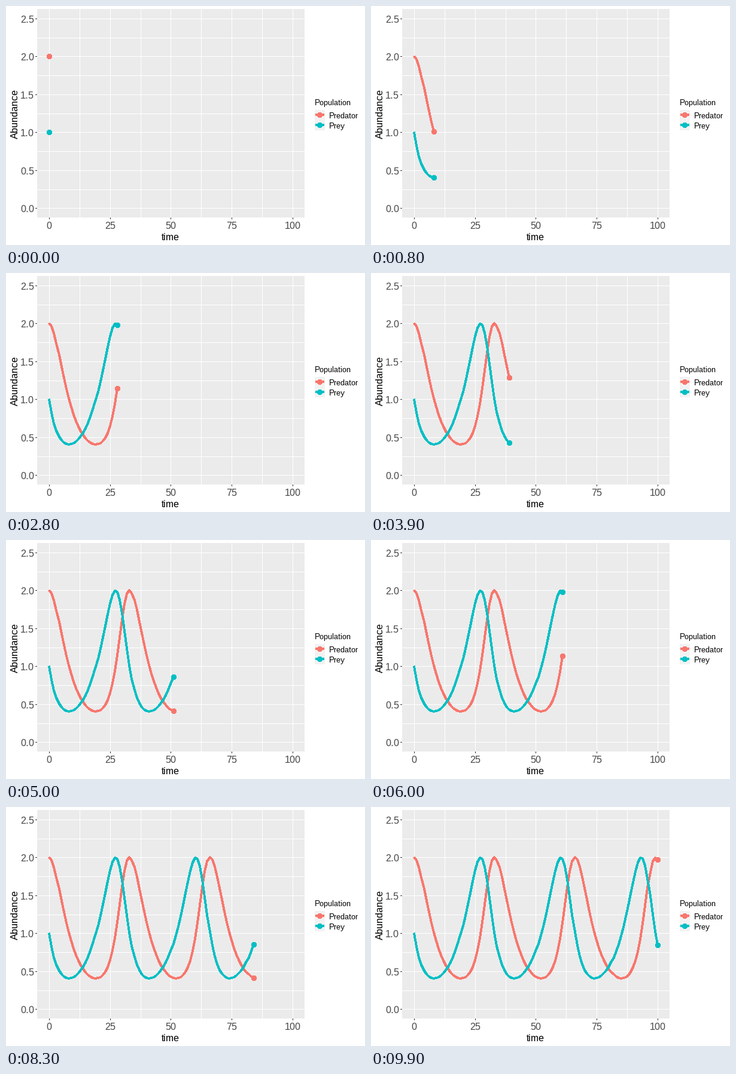
Recreate the animation shown at these times as a matplotlib script. Size 600 px wide and 400 px high, loop 10000 ms.

```python
import numpy as np
import matplotlib.pyplot as plt
from matplotlib.animation import FuncAnimation
from matplotlib.patches import Circle, Rectangle

plt.rcParams.update({
    "font.family": "Liberation Sans",
    "text.hinting": "native",
    "text.hinting_factor": 1,
    "path.simplify": False,
})

W, H, DPI = 600, 400, 100
PX = 72 / DPI  # one pixel in points
FRAMES, T_END = 100, 100
LEFT, TOP, RIGHT, BOTTOM = 52, 5, 499, 354
RED, TEAL = "#F8766D", "#00BFC4"

# Without antialiasing every touched pixel is filled, so these sizes
# come out as a 4 px line and a 9 px dot.
LINE_W, DOT_R = 2.8, 3.9


def col(t):
    return np.floor(72.25 + 4.0645 * np.asarray(t) + 0.5)


def row(v):
    return np.floor(338.25 - 126.9 * np.asarray(v) + 0.5)


def rate(s, k=0.2):
    prey, pred = s
    return k * np.array([prey * (1 - pred), pred * (prey - 1)])


def simulate(steps=10):
    """Predator-prey cycle sampled at whole time units (Runge-Kutta)."""
    s, h = np.array([1.0, 2.0]), 1 / steps
    out = [s]
    for _ in range(T_END):
        for _ in range(steps):
            a = rate(s)
            b = rate(s + h / 2 * a)
            c = rate(s + h / 2 * b)
            d = rate(s + h * c)
            s = s + h / 6 * (a + 2 * b + 2 * c + d)
        out.append(s)
    return np.array(out).T


fig = plt.figure(figsize=(W / DPI, H / DPI), dpi=DPI, facecolor="white")
ax = fig.add_axes([0, 0, 1, 1])
ax.set_xlim(0, W)
ax.set_ylim(H, 0)
ax.axis("off")


def box(x, y, w, h, color, z=1):
    ax.add_patch(Rectangle((x, y), w, h, fc=color, lw=0, antialiased=False, zorder=z))


def label(x, y, s, size, color="black", ha="left", rot=0):
    ax.text(x, y, s, fontsize=size * PX, color=color, ha=ha, va="baseline",
            rotation=rot, rotation_mode="anchor", zorder=9)


def stroke(x, y, color):
    return ax.plot(x, y, color=color, lw=LINE_W * PX, antialiased=False, snap=False,
                   solid_capstyle="butt", solid_joinstyle="round", zorder=4)[0]


def dot(x, y, color):
    return ax.add_patch(Circle((x + 0.5, y + 0.5), DOT_R, fc=color, lw=0,
                               antialiased=False, snap=False, zorder=5))


# panel, grid and axes
box(LEFT, TOP, RIGHT - LEFT, BOTTOM - TOP, "#EBEBEB")
for t in np.arange(0, 101, 12.5):
    box(col(t), TOP, 1, BOTTOM - TOP, "white", 2)
for v in np.arange(0, 2.6, 0.25):
    box(LEFT, row(v), RIGHT - LEFT, 1, "white", 2)
for t in range(0, 101, 25):
    box(col(t), BOTTOM, 1, 3, "#333333")
    label(col(t), 373, str(t), 17, "#4D4D4D", "center")
for v in np.arange(0, 2.6, 0.5):
    box(LEFT - 3, row(v), 3, 1, "#333333")
    label(47, row(v) + 7, f"{v:.1f}", 17, "#4D4D4D", "right")
label(275, 392, "time", 17, ha="center")
label(20, 180, "Abundance", 17, ha="center", rot=90)

# legend
label(516, 166, "Population", 13)
box(516, 174, 17, 34, "#F2F2F2")
for name, y, color in (("Predator", 182, RED), ("Prey", 199, TEAL)):
    stroke([517, 532], [y, y], color)
    dot(524, y, color)
    label(540, y + 6, name, 13)

# curves
prey, pred = simulate()
xs = col(np.arange(T_END + 1))
series = [(row(vals), stroke([], [], color), dot(0, 0, color))
          for vals, color in ((pred, RED), (prey, TEAL))]


def update(i):
    t = int(i * T_END / (FRAMES - 1) + 0.5)
    for ys, line, head in series:
        line.set_data(xs[:t + 1], ys[:t + 1])
        head.center = xs[t] + 0.5, ys[t] + 0.5
    return [a for s in series for a in s[1:]]


anim = FuncAnimation(fig, update, frames=FRAMES, interval=100,
                     repeat=True, repeat_delay=0, blit=False)
plt.show()
```
